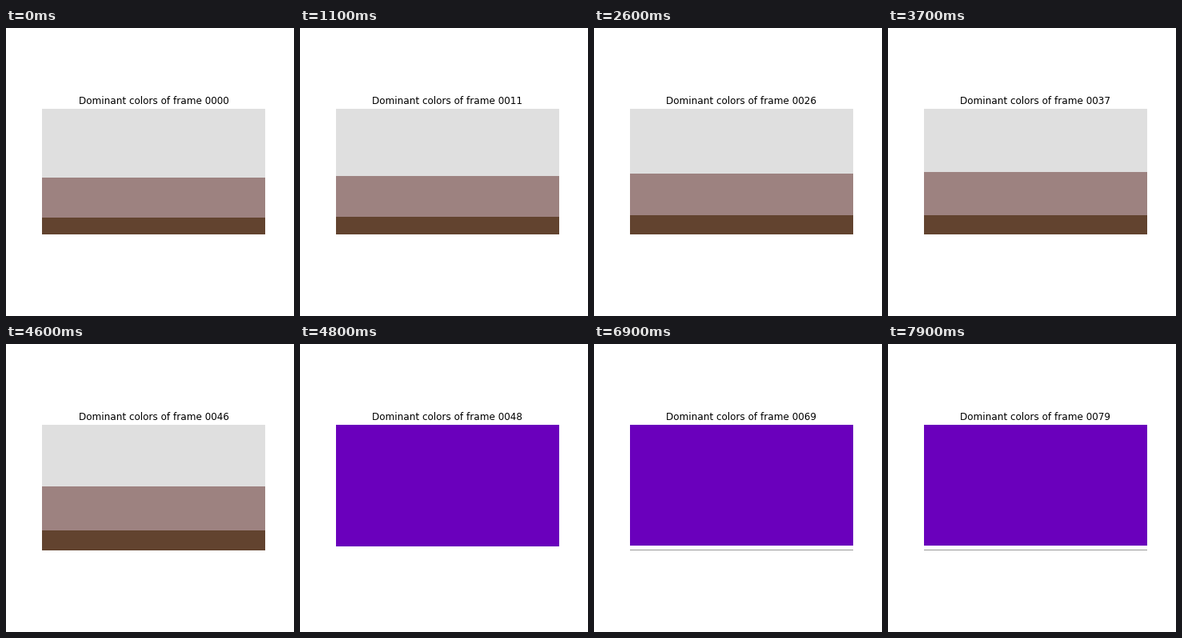
A matplotlib script for the animation above (8000 ms loop, 360 px wide and 360 px high).

```python
import matplotlib.pyplot as plt
import numpy as np
from matplotlib.animation import FuncAnimation
from matplotlib.patches import Rectangle

SIZE, DPI = 360, 72
FRAMES, INTERVAL = 80, 100
LEFT, RIGHT, TOP, BOTTOM = 45, 324, 101, 258

GREY, MAUVE, BROWN = "#dfdfdf", "#9d8280", "#62432f"
PURPLE, WHITE, LINE = "#6a00bc", "#ffffff", "#969696"

CUT = 47         # scene change
LINE_START = 59  # thin third colour appears
KEYS = [0, 11, 26, 31, 37, 46]
UPPER = [187, 185, 182, 181.2, 180, 178.4]
LOWER = [237, 236, 234.4, 234.7, 233.9, 233.2]

fig = plt.figure(figsize=(SIZE / DPI, SIZE / DPI), dpi=DPI, facecolor="white")
ax = fig.add_axes([0, 0, 1, 1])
ax.set_xlim(0, SIZE)
ax.set_ylim(SIZE, 0)
ax.axis("off")

bands = [ax.add_patch(Rectangle((LEFT, TOP), RIGHT - LEFT, 1, lw=0, antialiased=False))
         for _ in range(3)]
title = ax.text((LEFT + RIGHT) / 2, 94.63, "", ha="center", va="baseline",
                family="DejaVu Sans", size=12, color="black")


def palette(i):
    """Inner band edges and the three band colours."""
    if i < CUT:
        edges = [round(float(np.interp(i, KEYS, e))) for e in (UPPER, LOWER)]
        return edges, (GREY, MAUVE, BROWN)
    if i < LINE_START:
        return [253, BOTTOM], (PURPLE, WHITE, WHITE)
    return [252, BOTTOM - 1], (PURPLE, WHITE, LINE)


def update(i):
    inner, colors = palette(i)
    edges = [TOP, *inner, BOTTOM]
    for band, y0, y1, color in zip(bands, edges, edges[1:], colors):
        band.set_y(y0)
        band.set_height(y1 - y0)
        band.set_facecolor(color)
    title.set_text(f"Dominant colors of frame {i:04d}")
    return [*bands, title]


anim = FuncAnimation(fig, update, frames=FRAMES, interval=INTERVAL,
                     repeat=True, repeat_delay=0)
plt.show()
```
